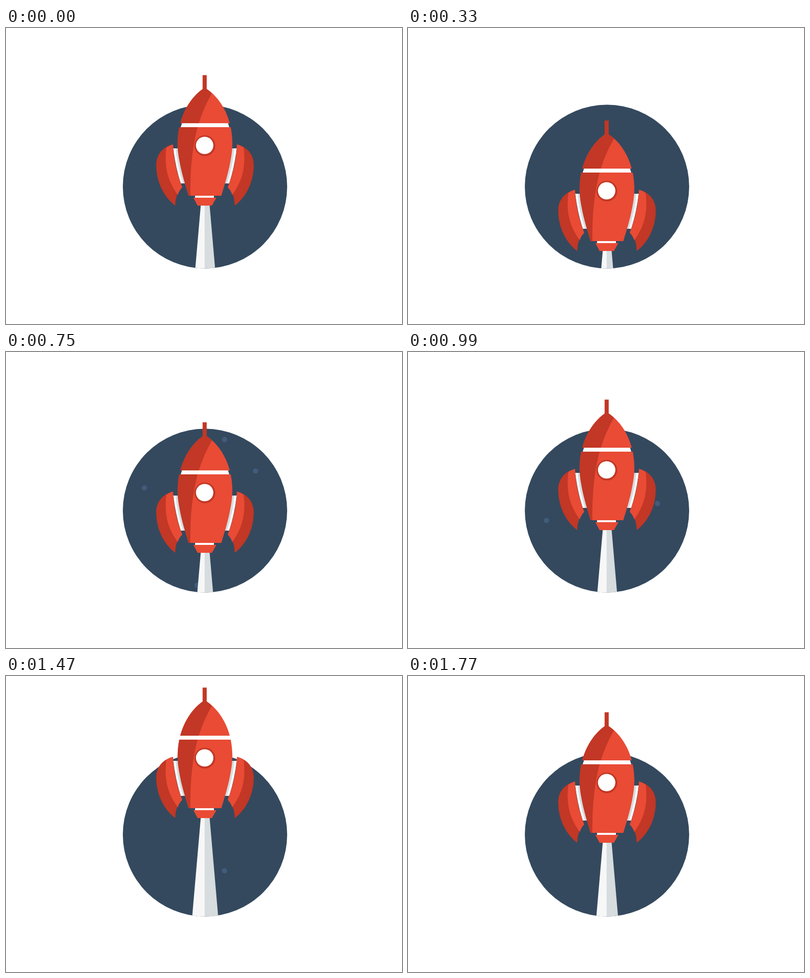
Animation of 800x600 px, one loop 1.83 s. Source, as an HTML page:

```html
<!DOCTYPE html>
<html lang="en">
<head>
<meta charset="utf-8">
<title>Rocket</title>
<style>
  html, body { margin: 0; width: 100%; height: 100%; overflow: hidden; background: #fff; }
  svg { display: block; width: 800px; height: 600px; }
  .red { fill: #e94b35; }
  .dark { fill: #c23725; }
  .white { fill: #fff; }
  .grey { fill: #d7dcde; }
  .star { fill: #415b7a; }
</style>
</head>
<body>
<svg viewBox="0 0 800 600">
  <defs>
    <clipPath id="porthole"><circle cx="402" cy="321.5" r="166"/></clipPath>
    <g id="fin">
      <path class="white" d="M338 244H350L365 315H353Q342 280 338 244Z"/>
      <path class="grey" d="M342.5 244H350L366 315H357.5Q346 280 342.5 244Z"/>
      <path class="dark" d="M337 236C318 241 303.5 255 303.5 278C303.5 312 319 343 342 360C342 345 346 333 356 323C346 297 339 268 337 236Z"/>
      <path class="red" d="M337.3 235.8Q330 238 324 242C319 280 326 310 347 338Q350 329 356 323C346 297 339 268 337.3 235.8Z"/>
    </g>
  </defs>

  <circle cx="402" cy="321.5" r="166" fill="#34495e"/>
  <g clip-path="url(#porthole)">
    <g id="stars"></g>
    <g class="ship">
      <path fill="#f7f7f7" d="M393.5 359H402V660H367.5Z"/>
      <path class="grey" d="M401.2 359H411.3L437.3 660H401.2Z"/>
    </g>
  </g>

  <g class="ship">
    <use href="#fin"/>
    <use href="#fin" transform="translate(804 0) scale(-1 1)"/>
    <path class="white" d="M382 339H420V345H382Z"/>
    <path class="red" d="M378.5 344H425L416 360H387Z"/>
    <path class="red" d="M350 201C345 228 346 248 351 272C355 295 363 320 369 340H435C441 320 449 295 453 272C458 248 459 228 454 201Z"/>
    <path class="dark" d="M350 201C345 228 346 248 351 272C355 295 363 320 369 340H372.5Q371 262 387 201Z"/>
    <path class="white" d="M355.5 193H448.5L451 201H353Z"/>
    <path class="red" d="M397 124L401.5 121.5L406 124C427 138 444 163 452 193H352C360 163 377 138 397 124Z"/>
    <path class="dark" d="M397 124L401.5 121.5L406 124Q411 127.5 416 132.3Q399 162 389.5 193H352C360 163 377 138 397 124Z"/>
    <rect class="dark" x="397.2" y="95.5" width="8.3" height="30"/>
    <circle class="dark" cx="401.8" cy="238.5" r="21"/>
    <circle class="white" cx="401.3" cy="238" r="17.6"/>
  </g>
</svg>
<script>
const LOOP = 1830;
const REST = 95;

// [ms, height of the antenna tip]
const path = [
  [0, 95], [120, 138], [240, 178], [300, 186.5], [330, 187], [458, 179],
  [570, 166.5], [750, 142], [990, 96], [1230, 50], [1350, 35], [1470, 23],
  [1575, 15], [1650, 27], [1710, 50], [1770, 73], [LOOP, 95]
];

// x and height at 750 ms
const stars = [[279.6, 275.5], [504, 241.2], [441.4, 177.5], [386, 473]];

const slope = i => {
  const a = path[Math.max(i - 1, 0)], b = path[Math.min(i + 1, path.length - 1)];
  const turn = (path[i][1] - a[1]) * (b[1] - path[i][1]);
  return turn < 0 ? 0 : (b[1] - a[1]) / (b[0] - a[0]);
};

// Cubic Hermite curve through the path
function shipY(t) {
  let i = 0;
  while (i < path.length - 2 && path[i + 1][0] <= t) i++;
  const [t0, y0] = path[i], [t1, y1] = path[i + 1];
  const d = t1 - t0, u = (t - t0) / d, v = 1 - u;
  return y0 * v * v * (1 + 2 * u) + y1 * u * u * (1 + 2 * v)
    + d * u * v * (slope(i) * v - slope(i + 1) * u);
}

// Steady drift that quickens near the top of the flight
const drift = t => (t - 750) * 0.275 + Math.max(0, t - 1230) * 0.08;

const step = t => t < 210 ? t - t % 30 : t - (t - 210) % 60;

const ships = document.querySelectorAll(".ship");
const dots = stars.map(([x]) => {
  const dot = document.createElementNS("http://www.w3.org/2000/svg", "circle");
  dot.setAttribute("class", "star");
  dot.setAttribute("cx", x);
  dot.setAttribute("r", 5.4);
  document.getElementById("stars").append(dot);
  return dot;
});

function draw(t) {
  const y = shipY(t) - REST;
  ships.forEach(s => s.setAttribute("transform", `translate(0 ${y.toFixed(2)})`));
  dots.forEach((dot, i) => dot.setAttribute("cy", stars[i][1] + drift(t)));
}

const start = performance.now();
function tick() {
  draw(step((performance.now() - start) % LOOP));
  requestAnimationFrame(tick);
}
tick();
</script>
</body>
</html>
```
